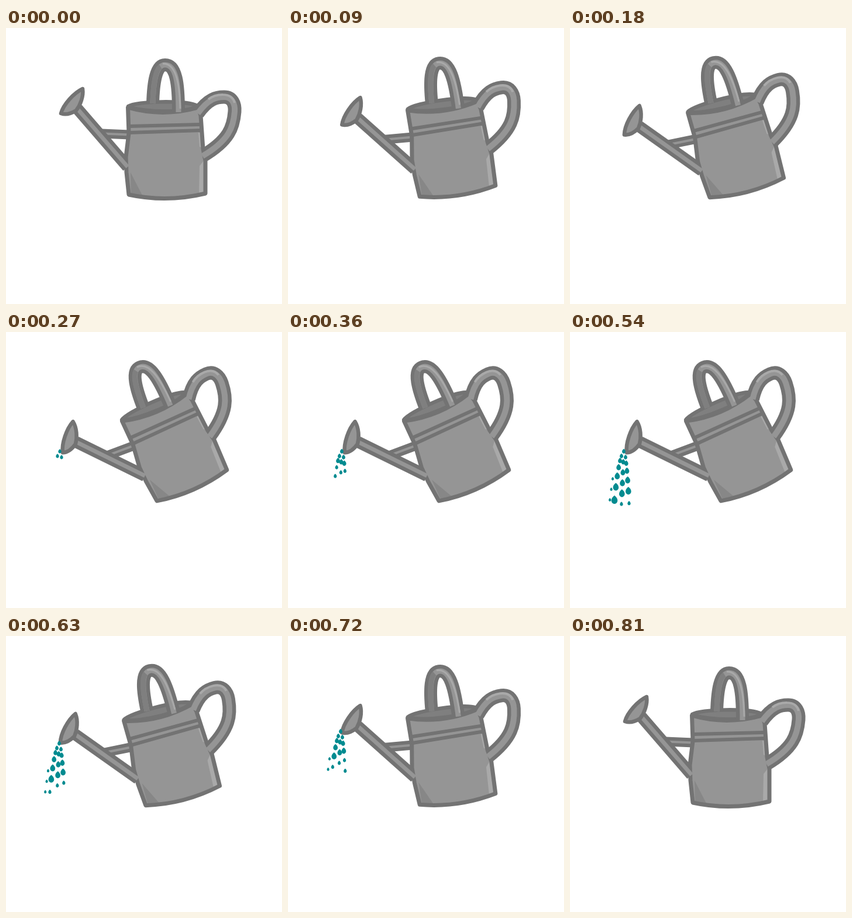
Recreate the animation shown at these times as an HTML page with a canvas. Size 472 by 472 pixels, loop 0.9 s.

```html
<!DOCTYPE html>
<html lang="en">
<head>
<meta charset="utf-8">
<title>Watering can</title>
<style>
  html, body { margin: 0; width: 100%; height: 100%; overflow: hidden; background: #fff; }
  canvas { display: block; }
</style>
</head>
<body>
<canvas id="stage" width="472" height="472"></canvas>
<script>
const ctx = document.getElementById('stage').getContext('2d');
const LINE = '#737373', BODY = '#959595', LIGHT = '#a9a9a9', SHADE = '#878787', INSIDE = '#7f7f7f';
const TEAL = '#008b90';

const STEP_MS = 90, STEPS = 10;
const PIVOT = [243.6, 168.9];
const TILTS = [0, 7.4, 13.9, 23];
const FIRST_WET = 3, FULLEST = 6, LAST_WET = 8;

const path = d => new Path2D(d);

// Tubes are centre lines drawn with a wide dark stroke and a narrower fill
const SPOUT = path('M122 138L208 237.5');
const BAR = path('M164 180.5L211 182.5');
const HANDLE = path('M328 146C346 121 360 118 373 118C387 118 392 130 391 143C389 169 382 192 336 219');
const LOOP = path('M251 129C252 95 256 63 272 63C291 63 295 95 295 144');
const BACK_LEG = path('M251 129C252 95 255 72 264 66');
const LOOP_GLEAM = path('M268 61C290 60 297 92 298 138');
const HANDLE_GLEAM = path('M346 122C358 113 386 108 391 128');

const VESSEL = path('M208.5 136L210 180L205 221L206 247L210 285Q275 299 341 283L341 227L337 207L333 150L329 136Q268 153 208.5 136Z');
const ROSE = path('M131 104C116 111 98 131 94 146C102 149 112 146 120 141C127 132 133 117 131 104Z');
const RIM = path('M209 134C222 125 308 123 327 133C316 145 236 146 209 134Z');
const BANDS = path('M211 168L332 165M210 179L334 175');
const CORNER_SHADE = path('M213 247L233 286L214 284Z');
const SIDE_GLEAM = path('M331 236L338 227L338 280L330 283ZM329 179L335 179L337 206L331 203Z');

function fill(shape, color) {
  ctx.fillStyle = color;
  ctx.fill(shape);
}

function stroke(shape, width, color = LINE) {
  ctx.lineWidth = width;
  ctx.strokeStyle = color;
  ctx.stroke(shape);
}

function drawCan(tilt) {
  const [x, y] = PIVOT;
  ctx.save();
  ctx.translate(x, y);
  ctx.rotate(-tilt * Math.PI / 180);
  ctx.translate(-x, -y);
  ctx.lineJoin = 'round';

  stroke(BAR, 16);
  stroke(BAR, 4, BODY);
  stroke(SPOUT, 20);
  stroke(HANDLE, 23);

  fill(VESSEL, BODY);
  fill(CORNER_SHADE, SHADE);
  fill(SIDE_GLEAM, LIGHT);
  stroke(VESSEL, 7);

  // Filling these after the vessel's outline joins them to the body
  stroke(SPOUT, 7, BODY);
  stroke(HANDLE, 10, BODY);
  stroke(HANDLE_GLEAM, 4, LIGHT);

  fill(ROSE, BODY);
  stroke(ROSE, 6.5);
  stroke(BANDS, 6);
  fill(RIM, INSIDE);
  stroke(RIM, 6.5);

  stroke(LOOP, 22);
  stroke(LOOP, 9, BODY);
  stroke(BACK_LEG, 9, INSIDE);
  stroke(LOOP_GLEAM, 3, LIGHT);
  ctx.restore();
}

function drawDrop(x, y, r) {
  ctx.beginPath();
  ctx.moveTo(x, y - r * 1.5);
  for (const side of [r, -r]) {
    const bottom = side > 0;
    const end = bottom ? 1.4 : -1.5;
    const [first, second] = bottom ? [[1.5, -.4], [1.3, 1.2]] : [[1.3, 1.2], [1.5, -.4]];
    ctx.bezierCurveTo(x + side * first[0], y + r * first[1], x + side * second[0], y + r * second[1], x, y + r * end);
  }
  ctx.fill();
}

// The stream hangs from the rose: it rises with it and ends at `reach`
function drawWater(step, pose) {
  const behind = 3 - pose;
  const reach = 310 - (step < FULLEST ? 31 : 39) * Math.abs(step - FULLEST);
  const drop = (x, y, size) => {
    const top = y - 20.5 * behind;
    if (top > reach) return;
    const radius = top > reach - 20 ? Math.min(size, Math.max(2.5, size / 2)) : size;
    drawDrop(x - behind, top, radius);
  };
  ctx.fillStyle = TEAL;
  for (let row = 0; row < 6; row++) {
    const size = 2.8 + row * .45;
    drop(92 - row * .8, 204 + row * 18, size);
    drop(88 - row * 2.4, 212 + row * 6 + row * row * 1.8, size);
    drop(95 + row * 1.2, 214 + row * 9 + row * row * 1.35, size);
    if (row < 3) drop(73 - row * 2.4, 251 + row * 18, 2);
  }
}

function render(time) {
  const step = Math.floor(time / STEP_MS) % STEPS;
  const pose = Math.min(step, 3, STEPS - 1 - step);
  ctx.fillStyle = '#fff';
  ctx.fillRect(0, 0, 472, 472);
  drawCan(TILTS[pose]);
  if (step >= FIRST_WET && step <= LAST_WET) drawWater(step, pose);
}

const start = performance.now();
function tick() {
  render(performance.now() - start);
  requestAnimationFrame(tick);
}
tick();
</script>
</body>
</html>
```
